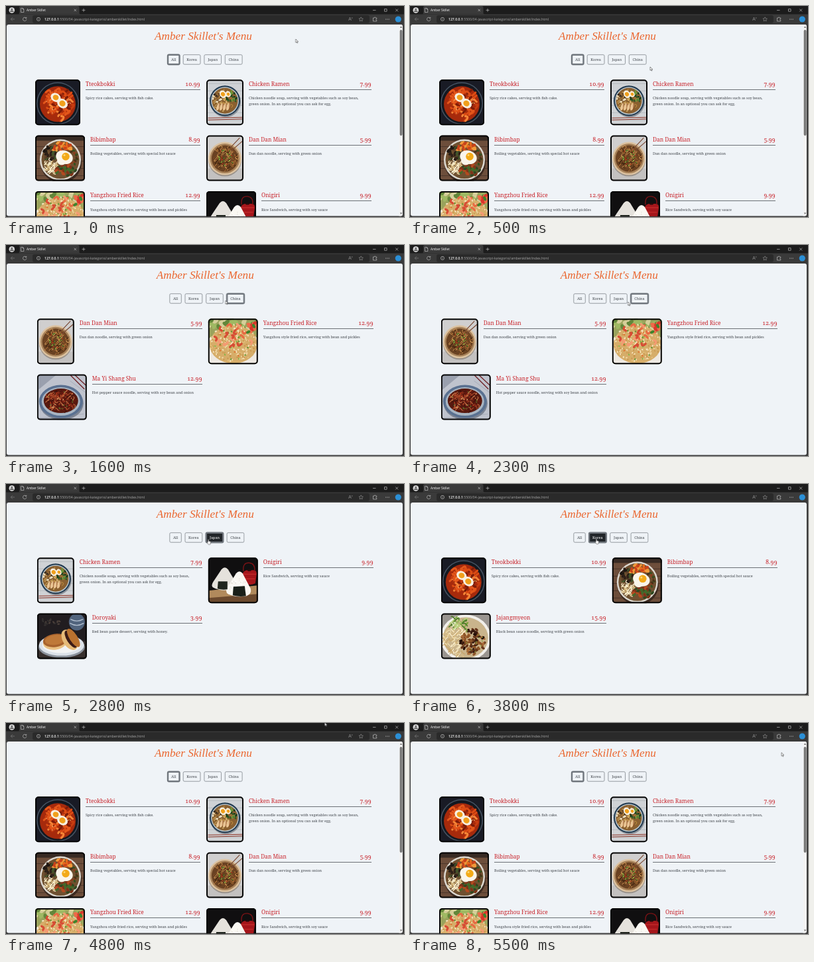
Animation, 600 px wide and 319 px high, one loop 5700 ms. Source, as an HTML page:

```html
<!DOCTYPE html>
<html lang="en">
<head>
<meta charset="utf-8">
<title>Amber Skillet</title>
<style>
html, body { margin: 0; width: 100%; height: 100%; overflow: hidden; background: #2b2b2b; }
svg.stage { display: block; width: 100vw; height: 100vh; }
.ui { font: 5.15px "Open Sans", sans-serif; fill: #a9a9a9; }
.ui .lit { fill: #fff; }
.icon { fill: none; stroke: #d4d4d4; stroke-width: .6; }
.title { font: italic 17.2px "Liberation Serif", serif; fill: #ea6730; text-anchor: middle; }
.name { font: 8.3px "Noto Serif", serif; fill: #c8232a; }
.price { font-size: 8.8px; font-variant-numeric: oldstyle-nums; text-anchor: end; }
.rule { stroke: #4b5056; stroke-width: .8; shape-rendering: crispEdges; }
.desc, .btn { font: 5.5px "Noto Serif", serif; fill: #40454b; }
.btn { text-anchor: middle; }
.box { fill: none; stroke: #5a6067; stroke-width: .6; }
.ring { fill: none; stroke: #70767d; stroke-width: 2.4; }
.dark rect { fill: #212529; }
.dark text { fill: #fff; }

/* every change is a hard step */
.step { animation: 5.7s step-end infinite; }
.all { animation-name: all; }
.china { animation-name: china; }
.japan { animation-name: japan; }
.korea { animation-name: korea; }
.dark.all { animation-name: hover-all; }
.dark.china { animation-name: hover-china; }
.dark.japan { animation-name: hover-japan; }
.dark.korea { animation-name: hover-korea; }
.shift { animation-name: shift; }
.cursor { animation-name: cursor; }
.hand { animation-name: hand; }
.arrow { animation-name: arrow; }

@keyframes all { 0%, 80.7% { visibility: visible; } 24.56% { visibility: hidden; } }
@keyframes china { 0%, 49.12% { visibility: hidden; } 24.56% { visibility: visible; } }
@keyframes japan { 0%, 66.66% { visibility: hidden; } 49.12% { visibility: visible; } }
@keyframes korea { 0%, 80.7% { visibility: hidden; } 66.66% { visibility: visible; } }
@keyframes shift { 0%, 80.7% { transform: none; } 24.56% { transform: translateX(2.8px); } }

@keyframes hover-all { 0%, 84.21%, 100% { opacity: 0; } 77.19% { opacity: 1; } 82.45% { opacity: .5; } }
@keyframes hover-china { 0%, 28.07%, 100% { opacity: 0; } 21.05% { opacity: 1; } 26.31% { opacity: .5; } }
@keyframes hover-japan { 0%, 57.89%, 100% { opacity: 0; } 43.85% { opacity: 1; } }
@keyframes hover-korea { 0%, 75.43%, 100% { opacity: 0; } 61.4% { opacity: 1; } }

@keyframes hand {
  0%, 28.07%, 57.89%, 75.43%, 82.45% { visibility: hidden; }
  21.05%, 43.85%, 61.4%, 77.19% { visibility: visible; }
}
@keyframes arrow {
  0%, 28.07%, 57.89%, 75.43%, 82.45% { visibility: visible; }
  21.05%, 43.85%, 61.4%, 77.19% { visibility: hidden; }
}
@keyframes cursor {
  0%, 100% { transform: translate(436.7px, 50px); }
  3.5% { transform: translate(426px, 57px); }
  5.26% { transform: translate(402px, 71px); }
  7.01% { transform: translate(378px, 84px); }
  8.77% { transform: translate(362px, 92px); }
  15.78% { transform: translate(347px, 90px); }
  21.05% { transform: translate(332px, 83.4px); }
  28.07% { transform: translate(330.8px, 84px); }
  40.35% { transform: translate(328.6px, 86px); }
  43.85% { transform: translate(311px, 84px); }
  49.12% { transform: translate(305px, 83.5px); }
  57.89% { transform: translate(297.5px, 85px); }
  61.4% { transform: translate(285px, 84px); }
  66.66% { transform: translate(281px, 82.8px); }
  75.43% { transform: translate(266px, 84px); }
  77.19% { transform: translate(255px, 83px); }
  82.45% { transform: translate(385px, 38px); }
  84.21% { transform: translate(480.5px, -.8px); }
  85.96% { transform: translate(510px, 6px); }
  87.71% { transform: translate(530px, 17px); }
  89.47% { transform: translate(546px, 29px); }
  91.22% { transform: translate(553px, 36px); }
  94.73% { transform: translate(558px, 42px); }
  96.49% { transform: translate(560px, 44.6px); }
}
</style>
</head>
<body>
<svg class="stage" viewBox="0 0 600 319" preserveAspectRatio="none">
  <defs id="defs"><clipPath id="page"><rect x="1" y="28" width="597" height="289.500" rx="3"/></clipPath></defs>

  <rect width="600" height="319" fill="#3a3a3a"/>
  <rect width="600" height="12.5" fill="#1c1c1c"/>
  <path d="M18 12.5q2 0 2-2V2.5q0-2.5 2.500-2.500H108q2.500 0 2.500 2.500V10.500q0 2 2 2z" fill="#3a3a3a"/>
  <rect x="40" y="14" width="508" height="12" rx="3" fill="#2a2a2a"/>
  <circle cx="8.800" cy="6.400" r="4.300" fill="#d9d9d9"/>
  <path d="M5.800 9a3 2.500 0 0 1 6 0z" fill="#666"/><circle cx="8.800" cy="5" r="1.500" fill="#666"/>
  <g class="icon">
    <path d="M22.500 3.300h2.800l1.500 1.500v4.700h-4.300zM25.200 3.300v1.600h1.600"/>
    <path d="M102.600 4.600l3.400 3.400m0-3.400l-3.400 3.400M114.500 6.300h5m-2.500-2.500v5"/>
    <path d="M553 6.400h4.500M570.500 4.500h3.600v3.600h-3.600zM587.200 4.400l4 4m0-4l-4 4"/>
    <path d="M30.300 18.200a2.700 2.700 0 1 0 .6 2M30.800 16.800v1.700h-1.700"/>
    <path d="M13 19.900H7.300m2.600-2.600l-2.600 2.600 2.600 2.600" stroke="#8a8a8a"/>
    <circle cx="49" cy="19.900" r="2.600"/><path d="M49 19.600v1.600M49 18.300v.6"/>
    <path d="M516.500 22l2-5 2 5m-3.300-1.700h2.600M521.500 17q1 1 0 2.200" stroke="#999"/>
    <path d="M535.200 16.800l1 2 2.200.3-1.600 1.600.4 2.200-2-1-2 1 .4-2.200-1.600-1.600 2.200-.3z" stroke="#999"/>
    <path d="M553.500 18h1.700a1 1 0 1 1 2 0h1.600v1.500a1 1 0 1 0 0 2V23h-5.300z"/>
  </g>
  <g fill="#d4d4d4"><circle cx="572.700" cy="20" r=".6"/><circle cx="575" cy="20" r=".6"/><circle cx="577.300" cy="20" r=".6"/></g>
  <circle cx="591.300" cy="20" r="4.600" fill="#2b8fd6"/>
  <g class="ui">
    <text class="lit" x="31" y="8.200" style="font-size:4.700px">Amber Skillet</text>
    <text x="58" y="21.900"><tspan class="lit" font-weight="600">127.0.0.1</tspan>:5500/04-javascript-kategorisi/amberskillet/index.html</text>
  </g>

  <g clip-path="url(#page)">
    <rect x="1" y="28" width="597" height="290" fill="#eff3f7"/>
    <g class="step all">
      <rect x="592.500" y="28" width="5.500" height="290" fill="#f3f3f3"/>
      <rect x="593.700" y="36" width="3.800" height="160" rx="1.900" fill="#777"/>
      <path d="M593.800 33l1.800-2.600 1.800 2.600zM593.800 312.500l1.800 2.600 1.800-2.600z" fill="#777"/>
    </g>
    <g class="step shift" id="main"><text class="title" x="297.500" y="51">Amber Skillet's Menu</text></g>
  </g>

  <g class="step cursor">
    <path class="step arrow" d="M0 0v5.300l1.300-1.100.8 1.900.9-.4-.8-1.800h1.700z" fill="#fff" stroke="#222" stroke-width=".5"/>
    <path class="step hand" d="M-.7 4.700V.6q.7-1 1.400 0v2.200l2.500.6q.6.2.5 1l-.5 2.600-.6.900H.2L-2 5q-.3-1 .6-.8z" fill="#fff" stroke="#222" stroke-width=".5"/>
  </g>
</svg>
<script>
let seed = 7;
const rnd = () => (seed = (seed * 16807) % 2147483647) / 2147483647;
const pick = list => list[Math.floor(rnd() * list.length)];

const rect = (x, y, w, h, fill) => `<rect x="${x}" y="${y}" width="${w}" height="${h}" fill="${fill}"/>`;
const oval = (x, y, rx, fill, ry = rx, turn = 0) =>
  `<ellipse cx="${x}" cy="${y}" rx="${rx}" ry="${ry}" fill="${fill}" transform="rotate(${turn} ${x} ${y})"/>`;
const shape = (d, fill) => `<path d="${d}" fill="${fill}"/>`;
const line = (d, color, w) => `<path d="${d}" fill="none" stroke="${color}" stroke-width="${w}" stroke-linecap="round"/>`;
const egg = (x, y, r, turn) => oval(x, y, r, '#f8f0e2', r * .8, turn) + oval(x, y, r * .56, '#f0a01c', r * .5, turn);

// n random pieces inside an oval
function spread(n, x, y, rx, ry, make) {
  let out = '';
  while (n--) {
    const a = rnd() * 6.283, r = Math.sqrt(rnd());
    out += make((x + Math.cos(a) * r * rx).toFixed(1), (y + Math.sin(a) * r * ry).toFixed(1));
  }
  return out;
}
const bits = (n, x, y, rx, ry, size, colors) =>
  spread(n, x, y, rx, ry, (a, b) => oval(a, b, size, pick(colors), size * .6, Math.round(rnd() * 180)));
const strands = (n, x, y, rx, ry, len, w, colors) => spread(n, x, y, rx, ry, (a, b) => {
  const t = rnd() * 6.283, dx = (Math.cos(t) * len).toFixed(1), dy = (Math.sin(t) * len).toFixed(1);
  return line(`M${a} ${b}q${dy} ${dx} ${dx} ${dy}`, pick(colors), w);
});
const planks = (w, base, seam) => {
  let out = rect(0, 0, w, 69, base);
  for (let y = 6; y < 69; y += 11) out += line(`M0 ${y}H${w}`, seam, .8);
  return out;
};

const photos = {
  tteok: () => rect(0, 0, 68, 69, '#191b25') + oval(34, 36, 32, '#465463') + oval(34, 36, 30.500, '#141820')
    + oval(34, 37, 27, '#a62a0c')
    + strands(65, 34, 38, 22, 22, 7, 3, ['#e4571b', '#c83d10', '#f58436', '#7d1c08', '#dc4c14'])
    + bits(20, 34, 40, 22, 20, 1, ['#7a9a34', '#f8bd7c', '#5a1206'])
    + egg(31, 27, 8, 30) + egg(41, 36, 8.500, 35),
  ramen: () => planks(56, '#cfd2d5', '#b2b6ba') + oval(29, 34, 23, '#8d9299') + oval(28, 32, 23, '#20394f')
    + oval(28, 32, 21, '#b9c4ca') + oval(28, 32, 19.500, '#8a6030')
    + strands(45, 26, 34, 15, 15, 5, 1, ['#e3bd6c', '#c99645', '#f0d38e'])
    + bits(30, 38, 27, 8, 10, 2, ['#2f5a26', '#6f9a3c', '#183a1c'])
    + bits(16, 17, 27, 7, 8, 2, ['#33291d', '#f1e3c2', '#6a4a2a']) + egg(25, 22, 6, 60) + egg(33, 22, 4.500, 70)
    + [18, 23, 28, 33].map(x => oval(x, 41, 2.400, '#e9c493', 6, 20) + line(`M${x + 2} 36v9`, '#8a4a1e', 1)).join('')
    + line('M3 58L54 57M3 61L54 59.500', '#8e3527', 1),
  bibim: () => planks(75, '#6d4e3b', '#423026') + rect(0, 0, 75, 8, '#382b24') + oval(39, 41, 31, '#3c2a20')
    + oval(38, 37, 31, '#dcd8d0') + oval(38, 37, 28.500, '#6f5030')
    + bits(40, 23, 27, 10, 11, 3, ['#2f2118', '#5c4028', '#41552a', '#1d1712'])
    + bits(34, 41, 18, 15, 8, 3, ['#e56a1c', '#c9421a', '#f09a3a'])
    + strands(38, 24, 47, 11, 9, 5, 1.300, ['#eee0b8', '#d5b67a', '#fff3d2'])
    + bits(38, 46, 53, 15, 8, 3, ['#803218', '#426a2a', '#b44a20', '#2d4820'])
    + bits(12, 58, 33, 6, 12, 2.500, ['#4b3018', '#8a3c1c', '#36501f'])
    + oval(44, 33, 13, '#faf5ea', 10, 20) + oval(40, 38, 7, '#faf5ea') + oval(46, 32, 5.800, '#f3aa18') + oval(44, 30, 1.500, '#fbd773'),
  dandan: () => rect(0, 0, 56, 69, '#d0cfcf') + rect(0, 50, 56, 19, '#c3c1c0') + oval(28, 37, 25, '#98918b')
    + oval(28, 35, 25, '#dcc2a0') + oval(28, 35, 22.500, '#a88259') + oval(28, 35, 20, '#6a4222')
    + strands(100, 28, 34, 17, 17, 6, 1, ['#b9783a', '#7d4a22', '#d39a58', '#42250f'])
    + bits(24, 29, 34, 13, 13, 1.400, ['#7fae3a', '#4d7c28', '#a23a1a'])
    + line('M34 21L50 4M38 23L54 9', '#7a4a34', 1.200),
  rice: () => rect(0, 0, 75, 69, '#9aa35c') + bits(40, 38, 8, 40, 10, 5, ['#9fb963', '#63873a', '#d6cf9a'])
    + oval(38, 48, 46, '#eee9e2', 30) + oval(38, 39, 36, '#d6ad69', 29)
    + bits(260, 38, 37, 35, 28, 1.500, ['#f0d9a6', '#e2bf7c', '#c9964e', '#fae9c6'])
    + bits(30, 38, 38, 30, 24, 1.600, ['#5c9632', '#83b545', '#e0702c'])
    + strands(18, 36, 25, 30, 18, 6, 3.200, ['#e86a42', '#d74c34', '#f49a72'])
    + bits(12, 62, 12, 11, 9, 3.500, ['#d9362a', '#3f842c', '#ee6a48']),
  onigiri: () => rect(0, 0, 75, 69, '#100f10') + shape('M0 50L75 42V69H0z', '#b18a5c') + shape('M0 61L75 55V69H0z', '#6c4a2e')
    + shape('M52 24q2-5 8-5h9q5 1 4 7l-2 13q-8 4-16 0z', '#a5161b') + line('M53 20q-1-13 9-12 9 1 8 12', '#7b1215', 1.400)
    + line('M53 25h19M55 32h15', '#d63a35', .8) + oval(62, 19, 3, '#260b0c', 1.500)
    + shape('M7 45Q4 42 8 36L20 18Q25 12 30 18L42 38Q44 46 36 48Q20 52 7 45z', '#e5e2dc')
    + shape('M30 55Q25 52 29 45L42 24Q47 18 52 24L64 47Q66 55 58 58Q42 61 30 55z', '#faf8f2')
    + bits(60, 45, 44, 13, 13, 1, ['#e4e0d8', '#fff']) + shape('M38 44l17-1 2 15q-10 2-20-1z', '#1a2019')
    + shape('M15 36l14 0v12q-9 1-15-1z', '#20251e'),
  mayi: () => rect(0, 0, 75, 69, '#bfc3cd') + shape('M0 0H30L0 25z', '#9aa0ae') + line('M4 66L70 60M50 10L74 28', '#a6abb8', 1)
    + oval(37, 44, 33, '#7c8493', 25) + oval(36, 41, 33, '#5a7191', 25) + oval(36, 41, 29, '#a8b5c2', 21.500)
    + oval(36, 40, 26, '#57190f', 18.500)
    + strands(110, 36, 39, 22, 16, 5, 1.100, ['#8b2b18', '#b34f2c', '#6a1a10', '#3d100b', '#c87649'])
    + bits(22, 36, 39, 21, 14, 1.200, ['#5f7c30', '#d03a1c', '#d9ad75']) + line('M51 2L71 22M57 1L74 17', '#71252a', 1.400),
  dora: () => rect(0, 0, 75, 69, '#211d20') + rect(0, 42, 75, 27, '#38302e')
    + oval(60, 13, 12, '#51647d', 13) + line('M51 9q9 5 18 0M50 15q10 6 20 0', '#b3c0d0', 1.300)
    + bits(16, 20, 12, 15, 8, 2, ['#34302f', '#4c403a'])
    + oval(37, 51, 35, '#8b929c', 16) + oval(37, 48, 34, '#dbe1e8', 16) + oval(37, 48, 29, '#f2f3f3', 12)
    + oval(27, 44, 18, '#e9c083', 11, -8) + oval(27, 41, 18, '#a8622c', 10, -8) + oval(27, 40, 15, '#bf7939', 7.500, -8)
    + oval(49, 40, 10, '#e6bb79', 17, -32) + oval(51, 39, 6, '#3b1b17', 15, -32) + oval(55, 37, 6, '#b9722f', 16, -32),
  jajang: () => rect(0, 0, 75, 69, '#9a9590') + oval(37, 37, 38, '#f1efea', 35) + oval(37, 37, 34, '#c9b48c', 31)
    + strands(80, 24, 42, 19, 23, 7, 1.200, ['#f0dfb2', '#dcc088', '#fff2d0', '#c8a568'])
    + bits(85, 48, 43, 18, 20, 3, ['#3b1c10', '#66361b', '#8c5327', '#251009', '#a86b38'])
    + strands(30, 28, 15, 14, 8, 7, 1.600, ['#7ea63c', '#b8d17b', '#4f7d2b', '#e6efc4'])
    + bits(12, 50, 42, 14, 16, 1.200, ['#d8aa62', '#7f9b3a'])
};

// photo, photo width, name, price, description lines
const dishes = [
  ['tteok', 68, 'Tteokbokki', '10.99', 'Spicy rice cakes, serving with fish cake.'],
  ['ramen', 56, 'Chicken Ramen', '7.99', 'Chicken noodle soup, serving with vegetables such as soy bean,', 'green onion. In an optional you can ask for egg.'],
  ['bibim', 75, 'Bibimbap', '8.99', 'Boiling vegetables, serving with special hot sauce'],
  ['dandan', 56, 'Dan Dan Mian', '5.99', 'Dan dan noodle, serving with green onion'],
  ['rice', 75, 'Yangzhou Fried Rice', '12.99', 'Yangzhou style fried rice, serving with bean and pickles'],
  ['onigiri', 75, 'Onigiri', '9.99', 'Rice Sandwich, serving with soy sauce'],
  ['mayi', 75, 'Ma Yi Shang Shu', '12.99', 'Hot pepper sauce noodle, serving with soy bean and onion'],
  ['dora', 75, 'Doroyaki', '3.99', 'Red bean paste dessert, serving with honey.'],
  ['jajang', 75, 'Jajangmyeon', '15.99', 'Black bean sauce noodle, serving with green onion']
];
const views = { all: [0, 1, 2, 3, 4, 5], china: [3, 4, 6], japan: [1, 5, 7], korea: [0, 2, 8] };
const buttons = [['all', 'All', 244, 17.500], ['korea', 'Korea', 267.200, 25.800], ['japan', 'Japan', 298.900, 25.600], ['china', 'China', 330.300, 25.800]];

function card(dish, slot) {
  const [id, w, name, price, ...lines] = dish;
  const x = slot % 2 ? 302 : 44, y = 111.300 + Math.floor(slot / 2) * 84.300, tx = w + 8;
  return `<g transform="translate(${x} ${y})"><use href="#${id}"/>
    <rect x="1" y="1" width="${w - 2}" height="67" rx="4" fill="none" stroke="#050505" stroke-width="2"/>
    <text class="name" x="${tx}" y="9.400">${name}</text><text class="name price" x="248.700" y="9.400">${price}</text>
    <path class="rule" d="M${tx} 15H248.700"/>
    ${lines.map((t, i) => `<text class="desc" x="${tx}" y="${29.700 + i * 9.300}">${t}</text>`).join('')}</g>`;
}

function button([id, label, x, w]) {
  const box = `x="${x}" y="73.700" width="${w}" height="14.500" rx="1.800"`;
  const text = `<text class="btn" x="${x + w / 2}" y="83">${label}</text>`;
  return `<rect class="box" ${box}/>${text}<g class="step dark ${id}"><rect ${box}/>${text}</g><rect class="step ring ${id}" ${box}/>`;
}

document.getElementById('defs').innerHTML +=
  [56, 68, 75].map(w => `<clipPath id="clip${w}"><rect width="${w}" height="69" rx="5"/></clipPath>`).join('')
  + dishes.map(([id, w]) => `<g id="${id}" clip-path="url(#clip${w})">${photos[id]()}</g>`).join('');

document.getElementById('main').innerHTML += buttons.map(button).join('')
  + Object.entries(views).map(([id, list]) =>
    `<g class="step ${id}">${list.map((n, slot) => card(dishes[n], slot)).join('')}</g>`).join('');
</script>
</body>
</html>
```
